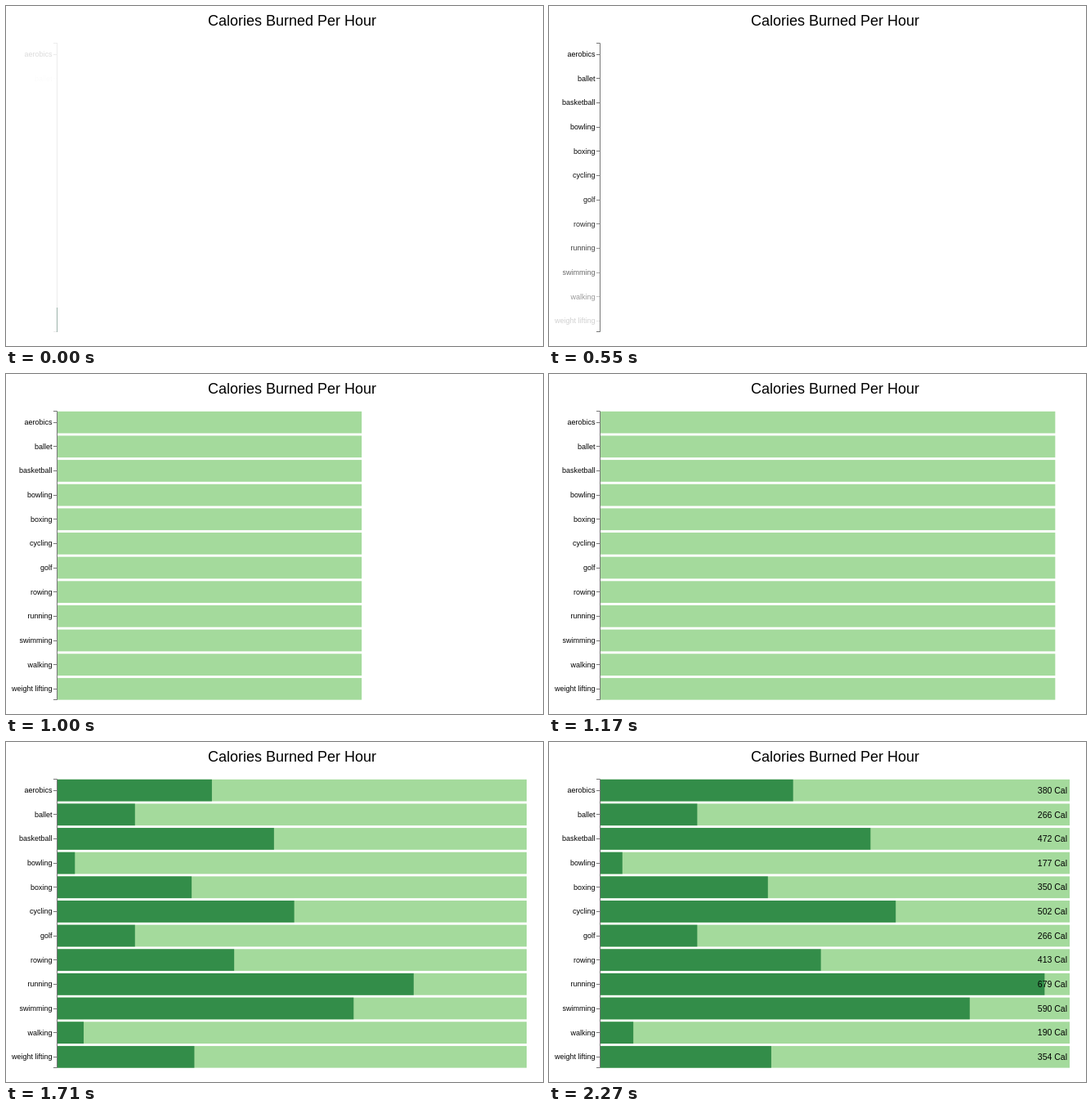
These frames come from a looping animation (657x416 px, 3050 ms). An HTML page:

```html
<!DOCTYPE html>
<html lang="en">
<head>
<meta charset="utf-8">
<title>Calories Burned Per Hour</title>
<style>
  html, body { margin: 0; width: 100%; height: 100%; overflow: hidden; background: #fff; }
  svg { display: block; width: 657px; height: 416px; font-family: "Liberation Sans", Arial, sans-serif; }
  .title { font-size: 18px; text-anchor: middle; }
  .label { font-size: 9px; text-anchor: end; }
  .value { font-size: 10.5px; text-anchor: end; }
  .axis { fill: none; stroke: #777; }
  .track { fill: #a4da9c; }
  .bar { fill: #338d49; }
</style>
</head>
<body>
<svg viewBox="0 0 657 416"></svg>
<script>
const LOOP = 3050;
const LEFT = 62, TOP = 45.8, STEP = 29.65, BAR = 26.7, WIDTH = 575;
const data = {
  aerobics: 380, ballet: 266, basketball: 472, bowling: 177, boxing: 350, cycling: 502,
  golf: 266, rowing: 413, running: 679, swimming: 590, walking: 190, "weight lifting": 354
};
// The picture advances at these times (ms).
const ticks = [0, 90, 160, 240, 320, 400, 470, 550, 630, 710, 780, 860, 940, 1020, 1090,
  1170, 1240, 1320, 1400, 1470, 1560, 1640, 1710, 1790, 1870, 1950, 2020, 2100, 2180, 2270];

const svg = document.querySelector("svg");

function add(tag, attrs, text = "") {
  const el = document.createElementNS("http://www.w3.org/2000/svg", tag);
  for (const key in attrs) el.setAttribute(key, attrs[key]);
  el.textContent = text;
  return svg.appendChild(el);
}

// cubic-bezier(.25, .1, .25, 1)
function ease(x) {
  if (x <= 0) return 0;
  if (x >= 1) return 1;
  const curve = (s, a, b) => 3 * (1 - s) ** 2 * s * a + 3 * (1 - s) * s * s * b + s ** 3;
  let lo = 0, hi = 1;
  for (let i = 0; i < 24; i++) {
    const mid = (lo + hi) / 2;
    if (curve(mid, 0.25, 0.25) < x) lo = mid; else hi = mid;
  }
  return curve(lo, 0.1, 1);
}
const phase = (t, start, duration) => ease((t - start) / duration);

add("text", { class: "title", x: 350, y: 24 }, "Calories Burned Per Hour");

const rows = Object.entries(data).map(([name, calories], i) => {
  const y = TOP + i * STEP, mid = y + BAR / 2;
  const rect = cls => add("rect", { class: cls, x: LEFT, y, height: BAR, width: 0 });
  return {
    size: (calories - 150) * 1.029,
    track: rect("track"),
    bar: rect("bar"),
    value: add("text", { class: "value", x: 634, y: mid + 3.7 }, calories + " Cal"),
    label: add("text", { class: "label", x: 56.5, y: mid + 2.9 }, name),
    tick: add("path", { class: "axis", d: `M58 ${Math.floor(mid) + 0.5}H62` })
  };
});

add("path", { d: "M62.5 369V399", stroke: "#a3bcb3" });
const domain = add("path", { class: "axis", d: "M58 45.5H62.5V398.5H58" });

function draw(t) {
  const grow = phase(t, 723, 575), fill = phase(t, 1270, 880), show = phase(t, 1850, 420);
  domain.setAttribute("opacity", phase(t, -64, 500));
  rows.forEach((row, i) => {
    const fade = phase(t, -64 + i * 49, 500);
    row.label.setAttribute("opacity", fade);
    row.tick.setAttribute("opacity", fade);
    row.track.setAttribute("width", WIDTH * grow);
    row.bar.setAttribute("width", row.size * fill);
    row.value.setAttribute("opacity", show);
  });
}

const start = performance.now();
function frame() {
  const t = (performance.now() - start) % LOOP;
  draw(ticks.findLast(tick => tick <= t));
  requestAnimationFrame(frame);
}
frame();
</script>
</body>
</html>
```
